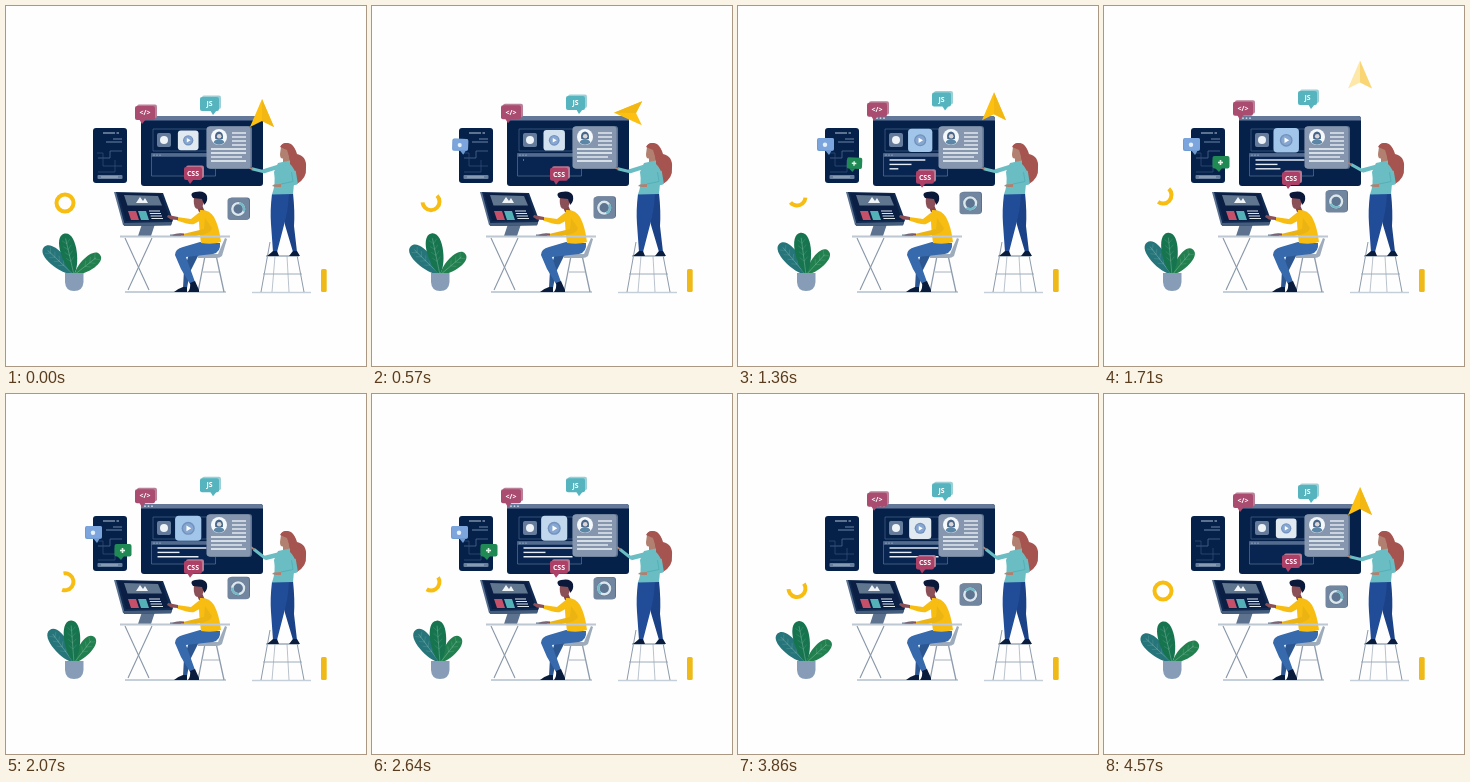
Animation of 360x360 px, one loop 4.64 s. Source, as an HTML page with a canvas:

```html
<!DOCTYPE html>
<html lang="en">
<head>
<meta charset="utf-8">
<title>Web design team</title>
<style>
html, body { margin: 0; width: 100%; height: 100%; overflow: hidden; background: #fefefe; }
canvas { display: block; width: 100vmin; height: 100vmin; }
</style>
</head>
<body>
<canvas id="stage"></canvas>
<script>
const SIZE = 360, LOOP = 4640, STEPS = 65;
const NAVY = '#05214a', YELLOW = '#f7bd12', SKIN = '#8a4f57', HAIR = '#a5544f', FACE = '#b28070', TEAL = '#6abdc3';
const canvas = document.getElementById('stage');
const ctx = canvas.getContext('2d');
const ratio = window.devicePixelRatio || 1;
canvas.width = canvas.height = SIZE * ratio;

const clamp = v => Math.max(0, Math.min(1, v));
const mix = (a, b, k) => a + (b - a) * k;
const rad = d => d * Math.PI / 180;
const smooth = v => { v = clamp(v); return v * v * (3 - 2 * v); };
const ramp = (t, from, to) => smooth((t - from) / (to - from));

function keyed(t, keys) {
  for (let i = 1; i < keys.length; i++) {
    const [t0, a] = keys[i - 1], [t1, b] = keys[i];
    if (t <= t1) return mix(a, b, clamp((t - t0) / (t1 - t0)));
  }
  return keys[keys.length - 1][1];
}

function box(x, y, w, h, fill, r = 0, stroke) {
  ctx.beginPath();
  ctx.roundRect(x, y, w, h, r);
  if (fill) { ctx.fillStyle = fill; ctx.fill(); }
  if (stroke) { ctx.strokeStyle = stroke; ctx.lineWidth = 0.7; ctx.stroke(); }
}
function poly(fill, ...p) {
  ctx.beginPath();
  for (let i = 0; i < p.length; i += 2) ctx.lineTo(p[i], p[i + 1]);
  ctx.closePath();
  ctx.fillStyle = fill;
  ctx.fill();
}
function line(color, width, ...p) {
  ctx.beginPath();
  for (let i = 0; i < p.length; i += 2) ctx.lineTo(p[i], p[i + 1]);
  ctx.strokeStyle = color;
  ctx.lineWidth = width;
  ctx.stroke();
}
function disc(x, y, r, fill) {
  ctx.beginPath();
  ctx.arc(x, y, r, 0, 7);
  ctx.fillStyle = fill;
  ctx.fill();
}
function arc(x, y, r, from, to, color, width) {
  ctx.beginPath();
  ctx.arc(x, y, r, rad(from), rad(to));
  ctx.strokeStyle = color;
  ctx.lineWidth = width;
  ctx.stroke();
}
function shape(fill, d) {
  ctx.fillStyle = fill;
  ctx.fill(new Path2D(d));
}
function at(x, y, turn, scale, draw) {
  ctx.save();
  ctx.translate(x, y);
  ctx.rotate(rad(turn));
  ctx.scale(scale, scale);
  draw();
  ctx.restore();
}

function label(x, y, w, h, tail, text, color, edge) {
  box(x + 2, y - 1.5, w, h - 0.5, edge, 2);
  box(x, y, w, h, color, 2);
  poly(color, x + tail - 3, y + h - 1, x + tail + 4, y + h - 1, x + tail, y + h + 4);
  ctx.fillStyle = '#fff';
  ctx.font = 'bold 7px "Noto Sans", "Open Sans", sans-serif';
  ctx.textAlign = 'center';
  ctx.textBaseline = 'middle';
  ctx.fillText(text, x + w / 2, y + h / 2 + 0.3);
}

function phone() {
  box(87, 122, 34, 55, NAVY, 3);
  line('#b5c5d6', 1, 97, 127, 109, 127);
  line('#b5c5d6', 1, 110.5, 127, 113, 127);
  line('#7790b0', 0.9, 107, 133, 116, 133);
  line('#7790b0', 0.9, 100, 136, 116, 136);
  line('#4c6990', 0.8, 92, 152, 104, 152, 104, 145, 116, 145);
  line('#34527d', 0.7, 91, 147, 97, 147, 97, 160, 116, 160);
  line('#34527d', 0.7, 109, 154, 109, 166, 92, 166);
  box(91.5, 169, 25, 4, '#687f9d', 1);
  line('#c2cedb', 0.7, 95, 171, 112, 171);
}

function badges(t) {
  const blue = ramp(t, 300, 620) * (1 - ramp(t, 2780, 3350));
  if (blue > 0.01) at(95, 147, 24 * (1 - blue), blue, () => {
    box(-16, -15, 17, 13, '#6f9bd2', 2);
    box(-15, -15, 16, 12, '#7ba5dc', 2);
    poly('#6f9bd2', -8, -3, -1, -3, -4, 2);
    disc(-8, -8.2, 2.2, '#e5f0fb');
  });
  const green = ramp(t, 1100, 1420) * (1 - ramp(t, 3230, 3650));
  if (green > 0.01) at(110, 163, 24 * (1 - green), green, () => {
    box(-1.5, -13, 17, 12.5, '#208a55', 2);
    poly('#208a55', 1, -1, 8, -1, 5, 3);
    line('#dff5e6', 1.6, 4, -6.5, 9, -6.5);
    line('#dff5e6', 1.6, 6.5, -9, 6.5, -4);
  });
}

function screen(t, sway) {
  box(135, 110, 122, 70, NAVY, 3);
  box(135, 110, 122, 4.5, '#64799a', [3, 3, 0, 0]);
  for (let i = 0; i < 3; i++) disc(139 + i * 3.5, 112.2, 0.9, '#c8d4e1');
  box(147, 123, 54, 22, null, 0, '#47648b');
  box(151, 127, 14, 14, '#657b9c', 2);
  disc(158, 134, 4, '#eef3f7');

  const tint = ramp(t, 200, 1400) * (1 - ramp(t, 2150, 3150));
  const rgb = [[225, 162], [234, 198], [241, 234]].map(([a, b]) => mix(a, b, tint) | 0);
  at(182.2, 134.3, 0, mix(0.86, 1.1, sway), () => {
    box(-12, -11.5, 24, 23, `rgb(${rgb})`, 3.5);
    disc(0, 0, 6, '#7291bb');
    disc(0, 0, 4.7, '#86a7d2');
    poly('#fff', -1.6, -2.6, -1.6, 2.6, 2.8, 0);
  });

  box(145.5, 147.5, 64, 22.5, '#082450', 0, '#5b7394');
  box(145.5, 147.5, 64, 3.2, '#536b8e');
  for (let i = 0; i < 3; i++) disc(148 + i * 3, 149.1, 0.7, '#b5c3d4');
  [49, 22, 49].forEach((w, i) => {
    const len = Math.min(w, (t - 560 - i * 300) * 0.045, (4450 - t) * 0.1);
    const y = 154 + i * 4.4;
    if (len > 0) line('#e6edf4', 1.4, 151.5, y, 151.5 + len, y);
  });

  box(202, 120, 44, 43, '#5d7390', 3);
  box(200.5, 120.5, 44, 42, '#8596ae', 3);
  disc(213, 131, 8, '#f6f9fb');
  shape('#46668c', 'M209.3 133Q208 126 213 125.5Q218 126 216.8 133Z');
  shape('#5c86a6', 'M207.5 136.5Q209 133 213 133Q217 133 218.5 136.5Q213 141 207.5 136.5Z');
  disc(213.2, 130.3, 2.3, '#dcd5d3');
  for (let i = 0; i < 8; i++) {
    const y = 127 + i * 4;
    line('#f2f6f9', 1.3, i < 4 ? 226 : 205, y, i === 6 ? 236 : 240, y);
  }
}

function gauge(t, lift) {
  const y = 203 - lift;
  box(223, y - 11.5, 21, 22, '#5a7090', 3);
  box(221.5, y - 11, 21.5, 22, '#72869f', 3);
  disc(232.2, y, 7.5, '#5d7591');
  arc(232.2, y, 5.9, 0, 360, '#dbe7ed', 2.4);
  const spin = t / LOOP * 360;
  arc(232.2, y, 5.9, spin - 80, spin + 25, '#76bac8', 2.4);
}

function ring(t, lift) {
  const y = 197 - lift;
  const from = keyed(t, [[0, -90], [570, -45], [1360, 5], [2070, -100], [3140, 25], [3860, -36], [4500, -90]]);
  const to = keyed(t, [[0, 270], [570, 175], [1360, 140], [2070, 110], [3140, 130], [3860, 176], [4500, 270]]);
  const gap = 17 * (1 - clamp(Math.abs(t - 3140) / 380));
  if (gap > 0) {
    arc(59, y, 8.5, from, 97 - gap, YELLOW, 4);
    if (to > 97 + gap) arc(59, y, 8.5, 97 + gap, to, YELLOW, 4);
  } else arc(59, y, 8.5, from, to, YELLOW, 4);
}

function cursor(t) {
  const turn = t < 1210 ? -90 * Math.sin(Math.PI * t / 1210) ** 2 : 0;
  const back = ramp(t, 4130, 4480);
  const rise = t < 4000 ? Math.min(41, Math.max(0, (t - 1280) * 0.0886)) : 0;
  ctx.globalAlpha = t < 4000 ? 1 - clamp((t - 1450) / 410) : back;
  if (ctx.globalAlpha > 0) at(256, 107 - rise, turn, t < 4000 ? 1 : mix(0.5, 1, back), () => {
    poly('#fdc010', 0, -14, 12, 14, 0, 8, -12, 14);
    poly('#f2b713', 0, -14, 12, 14, 0, 8);
  });
  ctx.globalAlpha = 1;
}

function leaf(turn, len, wide, color) {
  at(68, 269, turn, 1, () => {
    line(color, 1.5, 0, 0, 0, -8);
    shape(color, `M0 -1C${-wide * 0.8} -7 ${-wide * 1.25} ${-len} 0 ${-len}C${wide * 1.25} ${-len} ${wide * 0.8} -7 0 -1Z`);
    line('rgba(205,232,222,.45)', 0.6, 0, 0, 0, 5 - len);
    for (let y = 14; y < len - 6; y += 6) line('rgba(205,232,222,.25)', 0.5, -4, -y - 4, 0, -y, 4, -y - 4);
  });
}
function plant(sway) {
  leaf(mix(-47, -36, sway), 41, 10, '#25757a');
  leaf(mix(52, 37, sway), 33, 8.5, '#22804f');
  leaf(mix(-13, -4, sway), 42.5, 10.5, '#16754f');
  shape('#879db7', 'M59 267H77.5V276Q77 285 68 285Q59.5 285 59 276Z');
}

function desk() {
  line('#c5cfd9', 2, 119, 286, 220, 286);
  line('#8796a8', 1.1, 119, 232, 143, 284);
  line('#8796a8', 1.1, 146, 232, 122, 284);
  poly('#5c728f', 136, 218, 149, 218, 145, 230, 132, 230);
  poly('#5b708e', 108, 186, 111, 186, 121, 219, 117, 219);
  poly('#102a51', 110, 186, 157, 187, 167, 214, 165, 219, 119, 220);
  poly('#0a1f43', 112, 187, 155, 188, 164, 214, 120, 215);
  poly('#60768f', 118, 189, 152, 190, 156, 199.5, 121.5, 199.5);
  poly('#f0f4f7', 130, 197, 134, 191, 137, 195, 139, 192, 142, 197);
  poly('#c4506a', 122, 205, 130, 205, 133, 214, 125, 214);
  poly('#54b1b7', 132, 205, 140, 205, 143, 214, 135, 214);
  for (let i = 0; i < 4; i++) line('#dce5ec', 1, 143 + i * 0.8, 205 + i * 2.5, 154 + i, 205 + i * 2.5);
  poly('#455d7c', 117, 217, 166, 216, 165, 219.5, 118, 220);
}

function man() {
  line('#8d9bad', 1.3, 199, 250, 192, 286);
  line('#8d9bad', 1.3, 210, 249, 218, 286);
  line('#a5b1be', 1, 197, 266, 213, 266);
  shape('#9dabbb', 'M192 248H212L219 232L221 233L216 250Q214 252 210 252H192Z');
  shape('#2b568f', 'M183 248H193L184 266L181 282H177L178 264Z');
  shape('#3769ad', 'M194 236L214 237Q215 246 207 248L180 251L189 276L184 278L175 263L169 249Q169 243 177 241Z');
  shape('#0a1c3c', 'M168 286Q171 283 177 281L181 281V286Z');
  shape('#0a1c3c', 'M182 286Q185 282 184 277L189 275L193 284V286Z');
  poly('#834751', 190, 199, 196, 199, 199, 206, 193, 206);
  shape(SKIN, 'M188 191H197V199Q195 204 190 202.5Q187 200 188 191Z');
  shape('#0a1839', 'M187 192Q183 187 189 186Q199 184 201 190Q202 196 198 199L196 193Z');
  shape(YELLOW, 'M194 204Q203 203 208 211Q213 220 215 236Q206 239 195 237Q193 222 193 214Z');
  shape('#ecb413', 'M199 212L206 222Q205 230 178 231L177 228L198 223Z');
  shape(YELLOW, 'M195 205Q203 206 199 212L188 218Q183 219 171 214.5L171 211L185 213Z');
  shape(SKIN, 'M172 211L162 209L161 211L165 213.5L172 214Z');
  shape(SKIN, 'M178 227.5Q171 226.5 166 229L168 230.5H178Z');
  box(114, 229.5, 110, 2, '#bdc8d3');
  box(164, 228.5, 11, 1.2, '#637890');
}

function woman(raise) {
  line('#c5cfd9', 1.5, 246, 286.5, 305, 286.5);
  line('#8d9baa', 1, 264, 236, 255, 286);
  line('#a9b4c0', 0.8, 269, 250, 266, 286);
  line('#8d9baa', 1, 291, 249, 298, 286);
  line('#a9b4c0', 0.8, 281, 250, 283, 286);
  line('#9eabb9', 1.3, 260, 250, 293, 250);
  line('#9eabb9', 1, 257, 268, 296, 268);
  shape('#1b4287', 'M273 188L287 187Q289 206 288 220L291 246L287 246L279 219Z');
  shape('#214c97', 'M266 188L283 188Q282 206 278 219L271 246H267L265 218Q264 204 266 188Z');
  shape('#0b1d3d', 'M261 250Q265 247 267 245H271L273 250Z');
  shape('#0b1d3d', 'M283 250L287 245H291L294 250Z');
  shape(HAIR, 'M275 140Q278 135.5 285 138Q289 141 291 148Q301 150 300 162Q301 172 291 178Q286 172 284 160Z');
  shape(FACE, 'M275 141L282 141L283 151L284 157L277 157V152.5Q274 153 274 148Z');
  shape(HAIR, 'M274 141Q277 135 284 138Q288 144 284 153L281 144Z');
  shape(TEAL, 'M272 157L284 154.5Q290 157 289 167L287 188L266 188.5Q270 178 268 166Z');
  shape(HAIR, 'M284 149Q297 150 296 161Q296 170 291 173Q289 162 284 158Z');
  ctx.lineJoin = 'round';
  line(TEAL, 3.5, 288, 165, 290, 177, 275, 179.5);
  line('#4ba9b1', 0.7, 285.5, 166, 287, 175.5, 275, 178);
  shape(FACE, 'M275 178L268 178.5L266 180L270 181H275Z');
  const hx = mix(243, 245, raise), hy = mix(162, 153, raise);
  const ex = mix(257, 259, raise), ey = mix(165.5, 164, raise);
  line(TEAL, 4.4, 273, 160.5, ex, ey);
  line(TEAL, 3, mix(273, ex, 0.8), mix(160.5, ey, 0.8), ex, ey, mix(ex, hx, 0.8), mix(ey, hy, 0.8));
  line(FACE, 1.7, mix(ex, hx, 0.75), mix(ey, hy, 0.75), hx, hy);
}

function draw(t) {
  const sway = (1 - Math.cos(2 * Math.PI * t / LOOP)) / 2;
  ctx.setTransform(ratio, 0, 0, ratio, 0, 0);
  ctx.fillStyle = '#fefefe';
  ctx.fillRect(0, 0, SIZE, SIZE);
  phone();
  badges(t);
  screen(t, sway);
  label(129, 100 - 5 * sway, 20, 14, 7, '</>', '#a94c70', '#b98098');
  label(194, 91 - 7 * sway, 19, 14, 13, 'JS', '#55b4be', '#9dd0d6');
  label(178, 161 + 6 * sway, 18, 13, 6, 'CSS', '#ac4067', '#bb7890');
  cursor(t);
  gauge(t, 9 * sway);
  ring(t, 9.5 * sway);
  plant(sway);
  desk();
  man();
  woman(ramp(t, 1380, 1980) * (1 - ramp(t, 3880, 4420)));
  box(315, 263, 5.7, 23, '#efb918', 1.5);
}

const start = performance.now();
function tick(now) {
  const step = LOOP / STEPS;
  const t = Math.max(0, now - start) % LOOP;
  draw(Math.min(STEPS - 1, Math.floor((t + 4) / step)) * step);
  requestAnimationFrame(tick);
}
draw(0);
requestAnimationFrame(tick);
</script>
</body>
</html>
```
